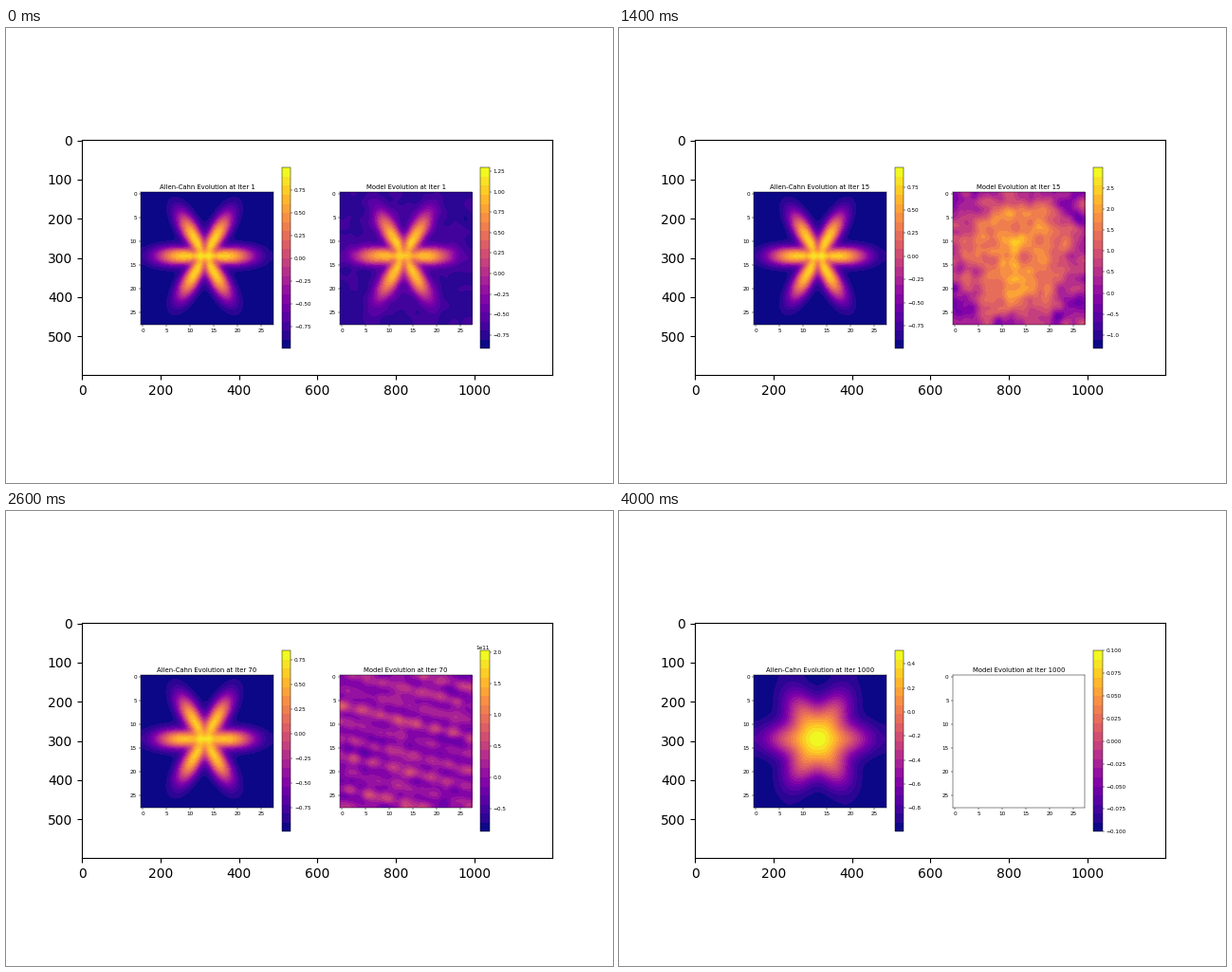
Write a matplotlib script that moves like this. It is 640 px wide and 480 px high and loops after 4200 ms.

```python
import numpy as np
import matplotlib.pyplot as plt
from matplotlib.animation import FuncAnimation

K = 496 / 1200  # scale of the inner 1200 x 600 plot on the stage
ITERS = [*range(1, 7), 10, 15, 30, 40, 45, *range(50, 81, 10), 100,
         *range(120, 161, 20), 200, 1000]
BLOW_UP = 200   # the model has overflowed from here on
N = 28

plt.rcParams.update({
    "font.family": "DejaVu Sans",
    "axes.linewidth": 0.8 * K,
    "axes.titlesize": 12 * K,
    "axes.titlepad": 6 * K,
})
for axis in ("xtick", "ytick"):
    plt.rcParams.update({
        f"{axis}.major.size": 3.5 * K,
        f"{axis}.major.width": 0.8 * K,
        f"{axis}.major.pad": 3.5 * K,
        f"{axis}.labelsize": 10 * K,
    })

yy, xx = np.mgrid[:N, :N].astype(float)
radius = np.hypot(xx - 13, yy - 13)
angle = np.arctan2(yy - 13, xx - 13)


def star(lobes=1.2, grow=0.0):
    return np.tanh(0.93 * (1.75 + lobes * np.cos(6 * angle) + grow - 0.318 * radius))


def diffuse(u, rate):
    p = np.pad(u, 1, mode="edge")
    return u + rate * (p[2:, 1:-1] + p[:-2, 1:-1] + p[1:-1, 2:] + p[1:-1, :-2] - 4 * u)


def smooth_noise(seed):
    u = np.random.default_rng(seed).normal(size=(N, N))
    for _ in range(2):
        u = diffuse(u, 0.12)
    return (u - u.mean()) / u.std()


def bead_rows():
    """Slanted rows of beads whose strength rises and falls from row to row."""
    total = np.zeros((N, N))
    for row in range(-4, 8):
        strength = 0.24 + 0.24 * np.cos(2 * np.pi * row / 2.6)
        for k in range(-1, 10):
            cx = 3.93 * k - 0.47 * row
            cy = 5.9 + 3.48 * row + 0.25 * cx
            total += strength * np.exp(-((xx - cx) / 1.25) ** 2 - ((yy - cy) / 0.95) ** 2)
    return total


def solve_reference():
    """Diffusing star, rescaled to a peak that decays and levels off."""
    u, fields = star(), {}
    for it in range(1, ITERS[-1] + 1):
        u = diffuse(u, 0.0021)
        if it in ITERS:
            peak = 1 / (1 + 0.0031 * it / (1 + it / 449))
            fields[it] = -0.998 + (peak + 0.998) * (u - u.min()) / np.ptp(u)
    return fields


NOISE = smooth_noise(4)
STRIPES = np.cos(2 * np.pi * (yy - 0.25 * xx - 5.9) / 3.48)
BEADS = bead_rows()
REFERENCE = solve_reference()


def progress(it, start, end):
    return np.clip((it - start) / (end - start), 0, 1)


def blend(a, b, t):
    return a + (b - a) * t


def growth(it, at_50, at_100):
    return at_50 * (at_100 / at_50) ** (it / 50 - 1)


def limits(it):
    early = [1, 3, 6, 15]
    low = np.interp(it, early, [-0.92, -0.81, -0.555, -1.32])
    high = np.interp(it, early, [1.296, 1.73, 1.945, 2.98])
    return low - growth(it, 1.37e5, 4.3e19), high + growth(it, 2.06e5, 1.96e20)


def model(it):
    """Field and colour limits: star melts to a blob, then stripes, then beads."""
    if it >= BLOW_UP:
        return np.full((N, N), np.nan), -0.1, 0.1
    melt = progress(it, 1, 15)
    fade = np.sqrt(melt)
    shape = (1 + star(1.2 - 0.95 * melt**2, 1.9 * melt**2)) / 2
    melted = 0.085 + 0.26 * fade + (0.86 - 0.5 * fade) * shape + (0.02 + 0.06 * fade) * NOISE
    striped = 0.39 + 0.06 * NOISE + 0.09 * STRIPES + 0.2 * BEADS
    beaded = 0.17 + 0.012 * NOISE + 0.035 * STRIPES + BEADS
    level = blend(blend(melted, striped, progress(it, 15, 50)), beaded, progress(it, 50, 100))
    low, high = limits(it)
    return low + (high - low) * np.clip(level, 0, 1), low, high


fig = plt.figure(figsize=(6.4, 4.8), dpi=100)
outer = fig.add_subplot()
outer.set_aspect("equal")
outer.set(xlim=(-0.5, 1199.5), ylim=(599.5, -0.5),
          xticks=range(0, 1001, 200), yticks=range(0, 501, 100))
outer.tick_params(labelsize=10, length=3.5, width=0.8, pad=3.5)
for spine in outer.spines.values():
    spine.set_linewidth(0.8)


def inner_axes(x, y, w, h):
    return fig.add_axes([(80 + K * x) / 640, 1 - (117.6 + K * (y + h)) / 480,
                         K * w / 640, K * h / 480])


def panel(x):
    side = 338.2
    ax = inner_axes(x, 303 - side / 2, side, side)
    image = ax.imshow(np.zeros((N, N)), cmap=plt.get_cmap("plasma", 20),
                      interpolation="bicubic", vmin=-1, vmax=1)
    ax.set(xticks=range(0, N, 5), yticks=range(0, N, 5))
    cax = inner_axes(x + 359.3, 72, 23.1, 462)
    cax.yaxis.OFFSETTEXTPAD = 3 * K
    fig.colorbar(image, cax=cax)
    return ax, image


left, left_image = panel(150)
right, right_image = panel(657.3)


def show(ax, image, name, it, field, low, high):
    image.set_data(field)
    image.set_clim(low, high)
    ax.set_title(f"{name} Evolution at Iter {it}")


def update(i):
    it = ITERS[i]
    u = REFERENCE[it]
    show(left, left_image, "Allen-Cahn", it, u, u.min(), u.max())
    show(right, right_image, "Model", it, *model(it))
    return []


anim = FuncAnimation(fig, update, frames=len(ITERS), interval=200,
                     repeat=True, repeat_delay=0, blit=False)
plt.show()
```
